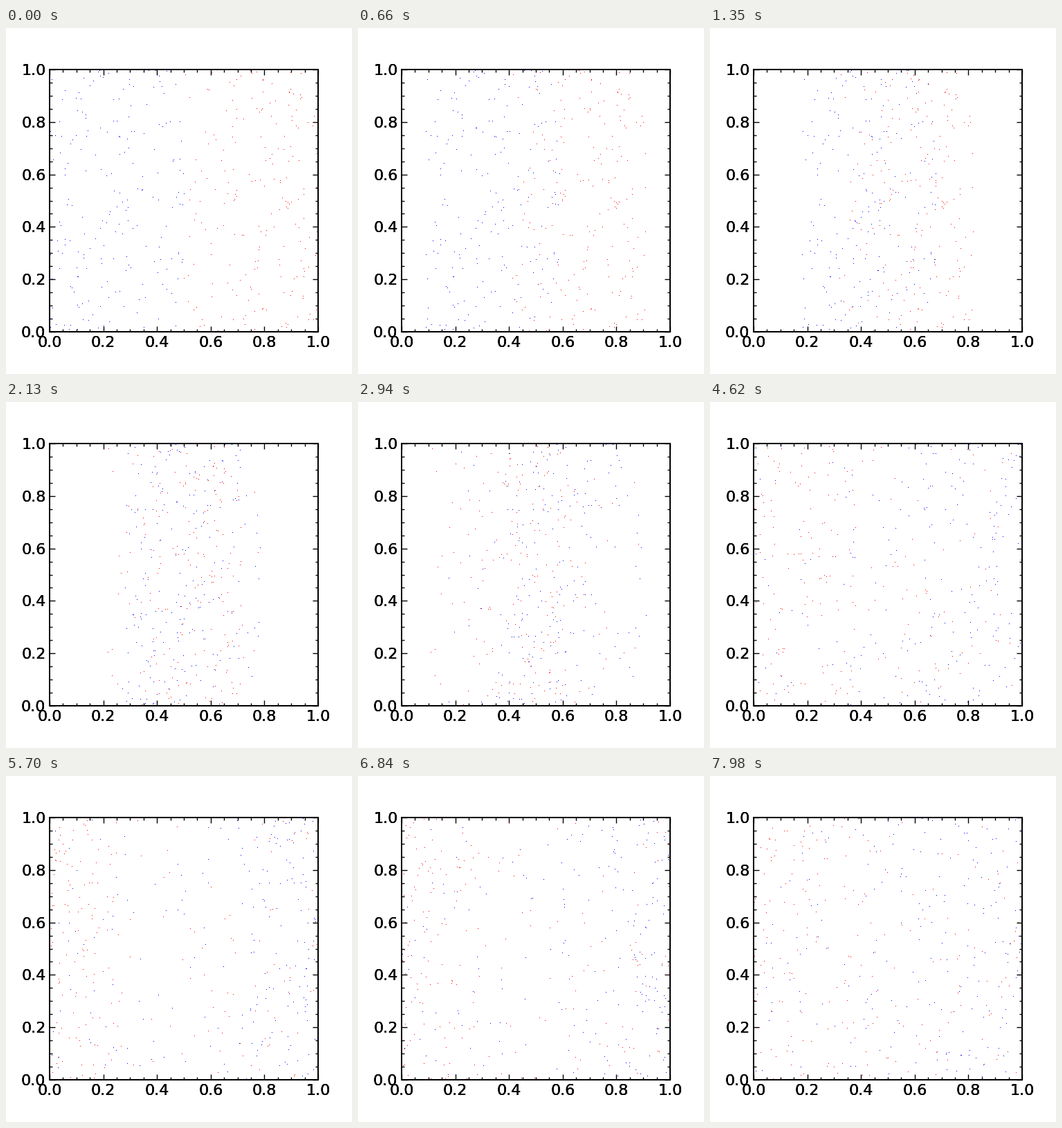
A matplotlib script for the animation above (8000 ms loop, 500 by 500 pixels).

```python
import matplotlib.pyplot as plt
import numpy as np
from matplotlib.animation import FuncAnimation
from matplotlib.ticker import AutoMinorLocator, MultipleLocator

SIZE = 500        # stage side in pixels
BOX = 63, 439, 451, 60   # plot edges in pixels: left, bottom, right, top
N = 400           # particles in the unit box
RADIUS = 0.0015
STEP = 0.004      # distance covered per frame
FRAMES = 267
LOOP_MS = 8000


def collide(pos, vel, first, second):
    """Elastic collisions of equal discs that overlap."""
    gap = pos[:, first] - pos[:, second]
    dist2 = (gap ** 2).sum(axis=0)
    hit = dist2 < (2 * RADIUS) ** 2
    a, b, gap = first[hit], second[hit], gap[:, hit]
    push = ((vel[:, a] - vel[:, b]) * gap).sum(axis=0) / dist2[hit] * gap
    new_a, new_b = vel[:, a] - push, vel[:, b] + push
    vel[:, a] = new_a
    vel[:, b] = new_b


def simulate(start, is_left):
    """Positions for all frames: two streams meet, scatter and bounce."""
    pos = start.copy()
    vel = np.zeros_like(pos)
    vel[0] = np.where(is_left, STEP, -STEP)
    first, second = np.triu_indices(N, 1)
    path = [pos]
    for _ in range(FRAMES - 1):
        collide(pos, vel, first, second)
        vel = np.where(pos > 1, -np.abs(vel), vel)
        vel = np.where(pos < 0, np.abs(vel), vel)
        pos = pos + vel
        path.append(pos)
    return path


def tick_label(ax, value, pad=4, layers=3):
    """Label both axes; stacked copies give the heavy glyph edges."""
    text = f"{value:.1f}"
    for _ in range(layers):
        ax.annotate(text, (value, 0), xytext=(0, -pad), ha="center",
                    va="top", textcoords="offset points")
        ax.annotate(text, (0, value), xytext=(-pad, 0), ha="right",
                    va="center_baseline", textcoords="offset points")


rng = np.random.default_rng(12)
start = rng.random((2, N))
left = start[0] <= 0.5
path = simulate(start, left)

plt.rcParams.update({"font.family": "DejaVu Sans", "font.size": 16,
                     "axes.linewidth": 1.44})
fig = plt.figure(figsize=(SIZE / 100, SIZE / 100), dpi=100, facecolor="white")
x0, y0, x1, y1 = BOX
ax = fig.add_axes([x0 / SIZE, 1 - y0 / SIZE, (x1 - x0) / SIZE, (y0 - y1) / SIZE])
ax.set(xlim=(0, 1), ylim=(0, 1))
for axis in (ax.xaxis, ax.yaxis):
    axis.set_major_locator(MultipleLocator(0.2))
    axis.set_minor_locator(AutoMinorLocator(4))
ax.tick_params(which="both", direction="in", top=True, right=True, width=1,
               labelbottom=False, labelleft=False)
ax.tick_params(which="major", length=6)
ax.tick_params(which="minor", length=3)
for value in np.linspace(0, 1, 6):
    tick_label(ax, value)

red, = ax.plot([], [], ",", color="red")
blue, = ax.plot([], [], ",", color="blue")


def draw(i):
    red.set_data(*path[i][:, ~left])
    blue.set_data(*path[i][:, left])
    return red, blue


anim = FuncAnimation(fig, draw, frames=FRAMES, init_func=lambda: draw(0),
                     interval=LOOP_MS / FRAMES, repeat=True, repeat_delay=0,
                     blit=True)
plt.show()
```
